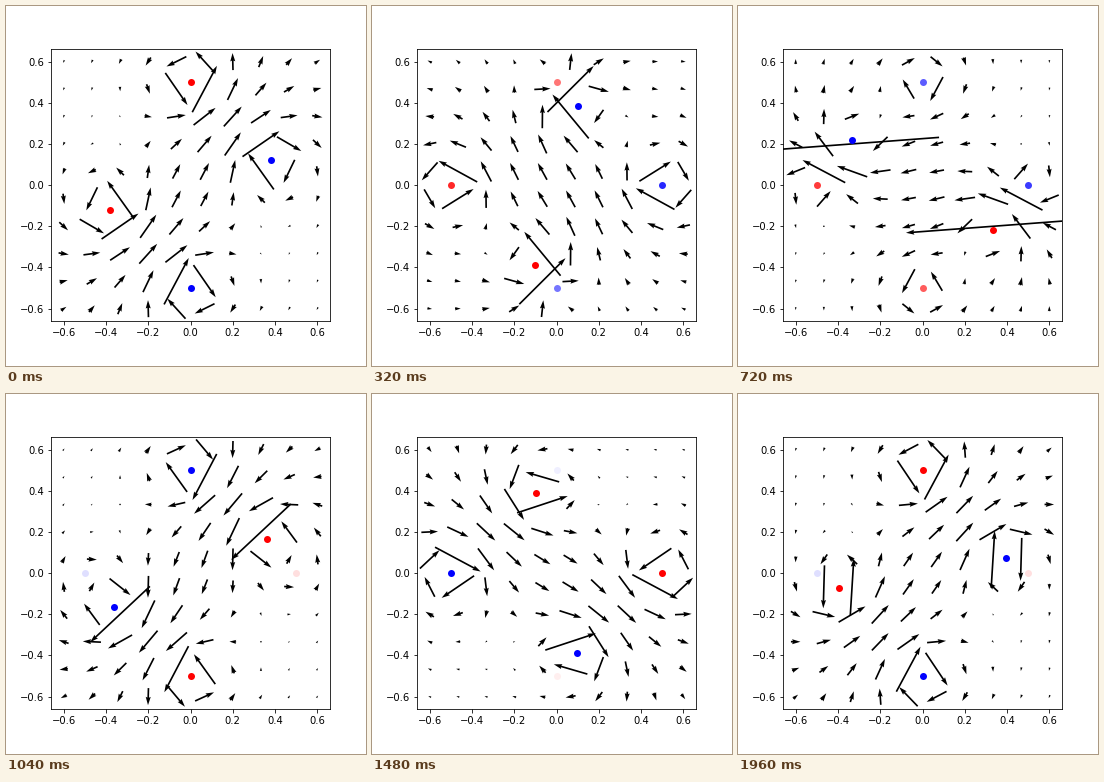
These frames come from a looping animation (360x360 px, 2 s). A matplotlib script:

```python
import numpy as np
import matplotlib.pyplot as plt
from matplotlib.animation import FuncAnimation

FRAMES = 50
STATOR_R, ROTOR_R = 0.5, 0.4
LEAD = 0.304  # rotor angle ahead of the stator phase, in radians
LIMIT = 0.66

fig, ax = plt.subplots(figsize=(5, 5), dpi=72)
fig.subplots_adjust(left=0.125, right=0.9, bottom=0.125, top=0.88)
ax.set(xlim=(-LIMIT, LIMIT), ylim=(-LIMIT, LIMIT))
ticks = np.linspace(-0.6, 0.6, 7)
ax.set_xticks(ticks)
ax.set_yticks(ticks)

X, Y = np.meshgrid(np.linspace(-0.6, 0.6, 10), np.linspace(-0.6, 0.6, 10))
arrows = ax.quiver(X, Y, np.ones_like(X), np.zeros_like(X), pivot="mid")
dots = [ax.plot([], [], "o", ms=7, mew=0)[0] for _ in range(6)]


def wires(n):
    """Return (x, y, current) of the four stator and two rotor wires."""
    t = 2 * np.pi * n / FRAMES
    c, s = np.cos(t), np.sin(t)
    rx, ry = ROTOR_R * np.cos(t + LEAD), ROTOR_R * np.sin(t + LEAD)
    pairs = [(0, STATOR_R, c), (-STATOR_R, 0, s), (-rx, -ry, 1)]
    return [(k * x, k * y, k * i) for x, y, i in pairs for k in (1, -1)]


def field(sources):
    u, v = np.zeros_like(X), np.zeros_like(Y)
    for x, y, i in sources:
        dx, dy = X - x, Y - y
        r2 = dx**2 + dy**2
        u -= i * dy / r2
        v += i * dx / r2
    return u, v


def draw(n):
    sources = wires(n)
    arrows.set_UVC(*field(sources))
    arrows.scale = None  # rescale to the mean field strength
    for dot, (x, y, i) in zip(dots, sources):
        dot.set_data([x], [y])
        dot.set_color("red" if i > 0 else "blue")
        dot.set_alpha(min(abs(i), 1))
    return [arrows, *dots]


draw(0)
anim = FuncAnimation(fig, draw, frames=FRAMES, interval=40, repeat=True,
                     repeat_delay=0)
plt.show()
```
